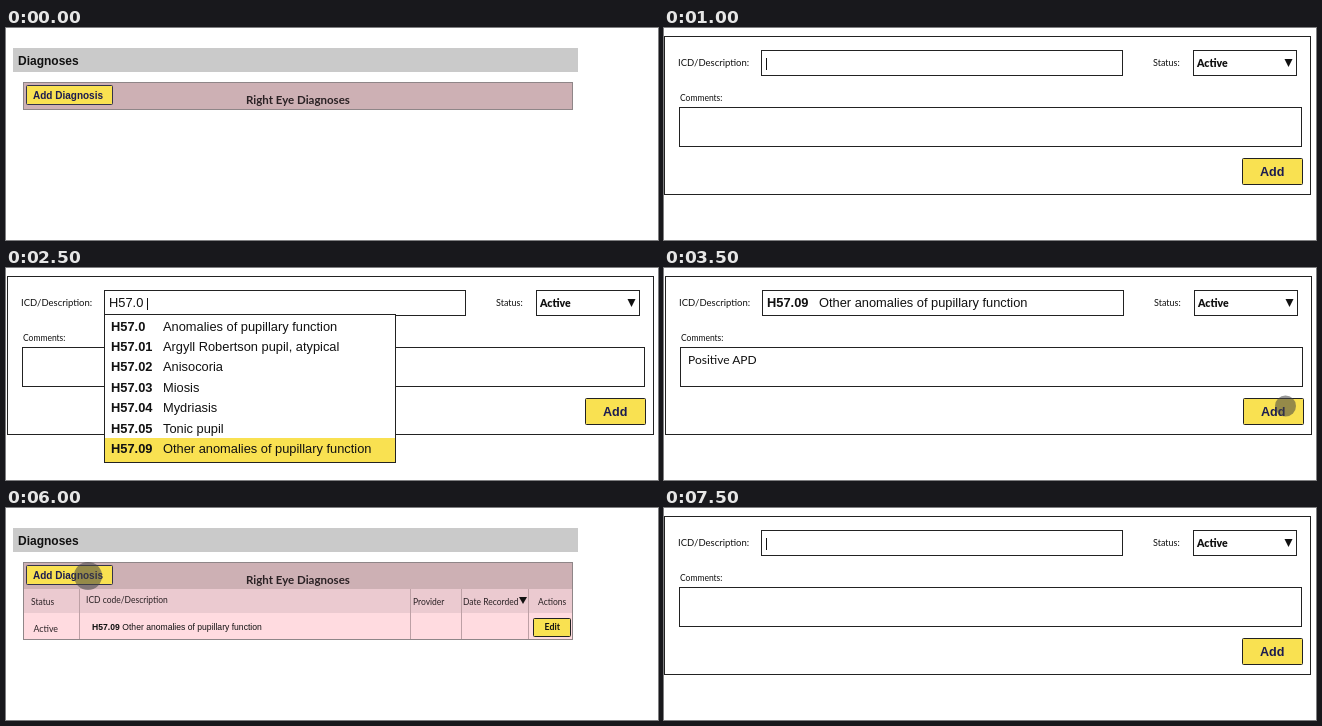
These frames come from a looping animation (652x212 px, 8000 ms). An HTML page:

```html
<!DOCTYPE html>
<html lang="en">
<head>
<meta charset="utf-8">
<title>Adding a diagnosis</title>
<style>
html, body { margin: 0; width: 100%; height: 100%; overflow: hidden; background: #fff; }
svg { display: block; }
text { font-family: Lato, sans-serif; fill: #111; white-space: pre; }
.arial { font-family: "Liberation Sans", Arial, sans-serif; }
.bold { font-weight: 700; }
.heavy { font-weight: 900; }
.navy { fill: #1c1c50; }
.soft { fill: #2b2225; }
</style>
</head>
<body>
<svg id="stage" width="652" height="212" viewBox="0 0 652 212"></svg>
<script>
const YELLOW = '#f9e151', INK = '#222';
const codes = [
  ['H57.0', 'Anomalies of pupillary function'],
  ['H57.01', 'Argyll Robertson pupil, atypical'],
  ['H57.02', 'Anisocoria'],
  ['H57.03', 'Miosis'],
  ['H57.04', 'Mydriasis'],
  ['H57.05', 'Tonic pupil'],
  ['H57.09', 'Other anomalies of pupillary function']
];

const text = (x, y, size, str, cls = '') =>
  `<text x="${x}" y="${y}" font-size="${size}" class="${cls}">${str}</text>`;
const fill = (x, y, w, h, color) =>
  `<rect x="${x}" y="${y}" width="${w}" height="${h}" fill="${color}"/>`;
const box = (x, y, w, h, color = '#fff', line = INK, r = 0) =>
  `<rect x="${x + .5}" y="${y + .5}" width="${w}" height="${h}" rx="${r}" fill="${color}" stroke="${line}"/>`;
const arrow = (x, y, w, h) => `<path d="M${x} ${y}h${w}l${-w / 2} ${h}z" fill="#111"/>`;
const caret = x => fill(x, 30, 1, 12, '#111');
const press = (x, y, r) => `<circle cx="${x}" cy="${y}" r="${r}" fill="#444" fill-opacity=".55"/>`;
const shift = (x, y, content) => `<g transform="translate(${x} ${y})">${content}</g>`;

function page(filled) {
  const table = filled
    ? fill(18, 81, 549, 24, '#ebcad0') + fill(18, 105, 549, 27, '#ffdbe0') +
      [73, 404, 455, 522].map(x => fill(x, 81, 1, 51, '#bda0a5')).join('') +
      text(25, 97, 8.5, 'Status', 'soft') + text(80, 95, 8.5, 'ICD code/Description', 'soft') +
      text(407, 97, 8.5, 'Provider', 'soft') + text(457, 97, 8.5, 'Date Recorded', 'soft') +
      arrow(513, 89, 8, 7) + text(532, 97, 8.5, 'Actions', 'soft') +
      text(27.5, 124, 8.8, 'Active', 'soft') +
      text(86, 122, 8.6, codes[6][0], 'arial bold') + text(116.3, 122, 8.6, codes[6][1], 'arial') +
      box(527, 110, 37, 18, YELLOW, INK, 1) + text(538.5, 122, 8.8, 'Edit', 'bold')
    : '';
  return fill(7, 20, 565, 24, '#cacaca') + text(12, 37, 12, 'Diagnoses', 'arial bold') +
    fill(17, 54, 550, 28, '#cdb0b4') + table +
    box(17, 54, 549, filled ? 77 : 27, 'none', '#8f8688') +
    box(20, 57, 86, 19, YELLOW, '#33334a', 1) +
    text(27, 71, 10, 'Add Diagnosis', 'arial bold navy') +
    text(240, 76, 11.5, 'Right Eye Diagnoses', 'bold soft');
}

const form = content =>
  box(0, 8, 646, 158) + text(14, 38, 9.5, 'ICD/Description:') +
  box(97, 22, 361, 25) + text(489, 38, 9, 'Status:') +
  box(529, 22, 103, 25) + text(533, 39, 10.5, 'Active', 'heavy') + arrow(620.5, 31, 8, 8) +
  text(16, 73, 8.5, 'Comments:') + box(15, 79, 622, 39) +
  box(578, 130, 60, 26, YELLOW, INK, 1) + text(596, 148, 12.6, 'Add', 'arial bold navy') + content;

function list(selected) {
  const rows = codes.map(([code, name], i) => {
    const y = 62.6 + 20.4 * i;
    return text(104, y, 12.85, code, 'arial bold') + text(156, y, 12.85, name, 'arial');
  }).join('');
  return text(102, 39, 12.85, 'H57.0', 'arial') + caret(140) + box(97, 46, 291, 148) +
    (selected ? fill(98, 170, 290, 24, YELLOW) : '') + rows;
}

const entry = text(102, 39, 12.85, codes[6][0], 'arial bold') +
  text(154, 39, 12.85, codes[6][1], 'arial') +
  text(23, 96, 12, 'Positive APD') + press(620.5, 138, 10.5);
const emptyForm = form(caret(102));

// Start time and content of each scene
const scenes = [
  [0, page(false)],
  [500, page(false) + press(82, 64, 14)],
  [1000, emptyForm],
  [1500, form(list(false))],
  [2500, shift(1, 0, form(list(true)))],
  [3500, shift(1, 0, form(entry))],
  [4000, page(true)],
  [6000, page(true) + press(82, 68, 14)],
  [6500, emptyForm + fill(639, 0, 13, 212, '#fff')],
  [7500, emptyForm]
];

const stage = document.getElementById('stage');
let shown;
function draw(now) {
  const scene = scenes.findLast(([start]) => start <= now % 8000);
  if (scene !== shown) stage.innerHTML = scene[1];
  shown = scene;
  requestAnimationFrame(draw);
}
draw(performance.now());
</script>
</body>
</html>
```
